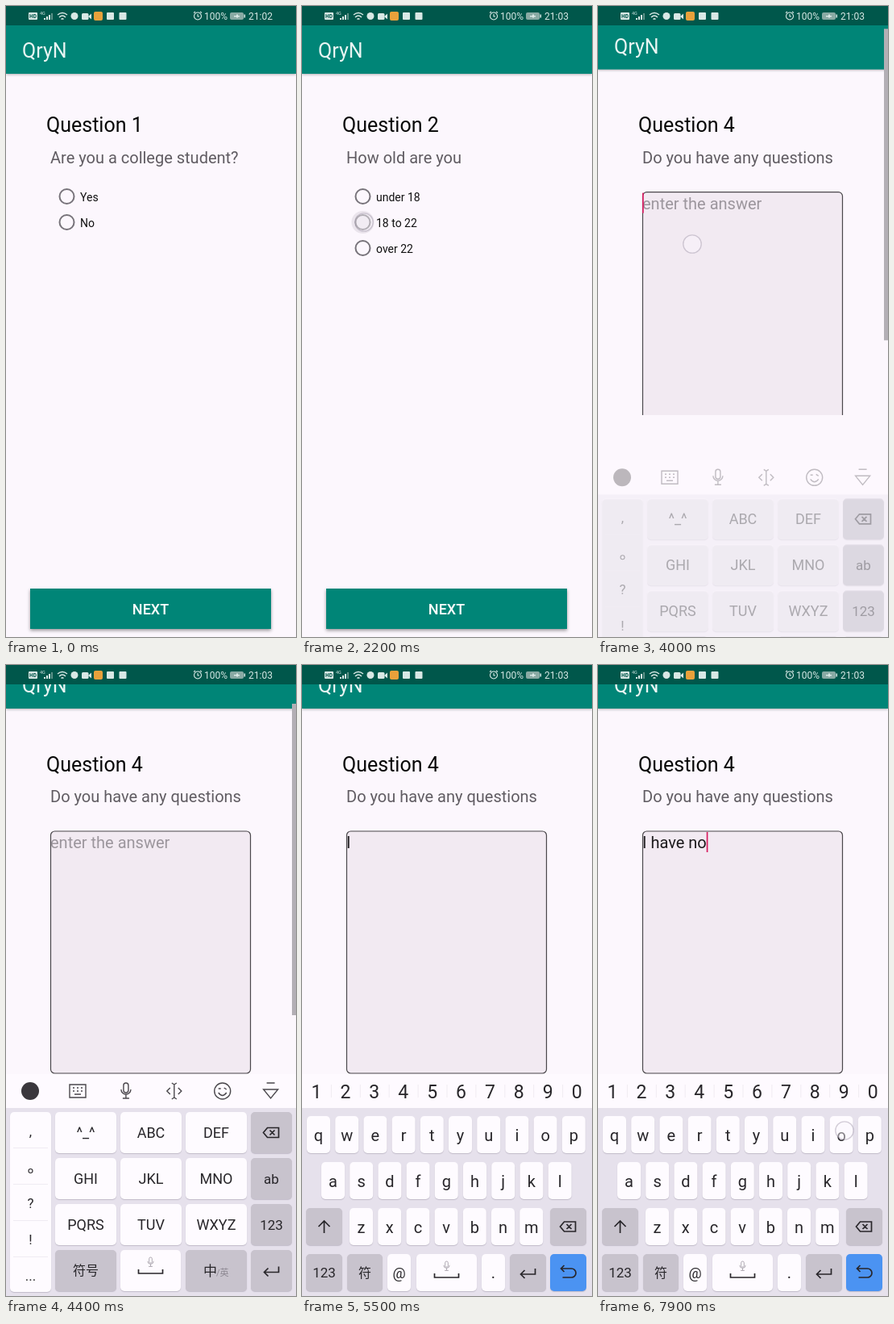
Write an HTML page with a canvas that moves like this. It is 360 px wide and 782 px high and loops after 8000 ms.

```html
<!DOCTYPE html>
<html lang="en">
<head>
<meta charset="utf-8">
<title>Survey app</title>
<style>
  html, body { margin: 0; width: 100%; height: 100%; overflow: hidden; background: #fcf7fd; }
  canvas { display: block; width: 100vw; height: 100vh; }
</style>
</head>
<body>
<canvas id="stage"></canvas>
<script>
const W = 360, H = 782, LOOP = 8000;
const canvas = document.getElementById('stage');
const c = canvas.getContext('2d');
const PAGE = '#fcf7fd', TEAL = '#008577', DARK_TEAL = '#00574b', ACCENT = '#b51f50';
const KEY = '#fefbff', GREY_KEY = '#c8c3cd', KEYS_BG = '#e6e1ec', INK = '#28262a';
const KEYBOARD_TOP = 507;

const questions = [
  { from: 0, tap: 1150, choice: 0, next: 1600, title: 'Question 1',
    text: 'Are you a college student?', options: ['Yes', 'No'] },
  { from: 1800, tap: 2100, choice: 1, next: 2400, title: 'Question 2',
    text: 'How old are you', options: ['under 18', '18 to 22', 'over 22'] },
  { from: 2600, tap: 2850, choice: 1, next: 3350, title: 'Question 3',
    text: 'Do you like college', options: ['a little', 'very', 'not at all'] },
];
const FORM_AT = 3600, FOCUS_AT = 3900, LATIN_AT = 4950, SHIFT_AT = 5200;
const typing = [[5400, 1], [5750, 2], [6150, 3], [6400, 4], [6600, 5], [6900, 6], [7200, 7], [7550, 8], [7850, 9]];
const ANSWER = 'I have no';

// start, duration, x, y
const touches = [
  ...questions.flatMap(q => [[q.tap, 150, 77, 236 + 32 * q.choice], [q.next, 130, 180, 748]]),
  [3900, 170, 117, 295], [4800, 130, 260, 752], [5080, 130, 27, 697], [5320, 130, 268, 583],
  [5700, 180, 179, 763], [6050, 150, 218, 641], [6320, 130, 38, 641], [6520, 130, 179, 702],
  [6800, 150, 91, 585], [7100, 150, 179, 760], [7480, 150, 249, 705], [7780, 220, 306, 577],
];

const icons = {
  backspace: 'M-10 0L-5-6H9V6H-5ZM-2-3L4 3M4-3L-2 3',
  enter: 'M9-5V2H-8M-4-3L-9 2L-4 7',
  shift: 'M0 8V-7M-7 0L0-7L7 0',
  undo: 'M-5-9L-9-5L-5-1M-9-5H4A5 5 0 0 1 4 6H-7',
  mic: 'M-3-7a3 3 0 0 1 6 0v6a3 3 0 0 1-6 0zM-6-2a6 6 0 0 0 12 0M0 4V9M-4 9H4',
  space: 'M-15-3V2H15V-3',
  keyboard: 'M-10-8H10V8H-10ZM-6-4h2M-1-4h2M4-4h2M-6 0h2M-1 0h2M4 0h2M-4 4H4',
  caret: 'M-5-4L-9 0L-5 4M5-4L9 0L5 4M0-8V8M-3-10L0-8L3-10M-3 10L0 8L3 10',
  smiley: 'M10 0A10 10 0 1 1-10 0A10 10 0 1 1 10 0M-5-3h3M2-4l3 2M-5 2Q0 9 5 2',
  collapse: 'M-5-10H5M-9-2H9L0 9Z',
  alarm: 'M4.5 0A4.5 4.5 0 1 1-4.5 0A4.5 4.5 0 1 1 4.5 0M0-2.5V.5H2M-5-4L-3-5.5M5-4L3-5.5',
  wifi: 'M-6-2Q0-7 6-2M-4 1Q0-3 4 1M-1.5 3.5Q0 2 1.5 3.5',
};

const clamp = v => Math.max(0, Math.min(1, v));
const smooth = v => (v = clamp(v), v * v * (3 - 2 * v));
const within = (t, start, length) => t >= start && t < start + length;

function text(s, x, y, size, color = INK, align = 'left', weight = 400) {
  c.font = `${weight} ${size}px Roboto, "Noto Sans CJK SC", "Noto Sans CJK", sans-serif`;
  c.textAlign = align;
  c.fillStyle = color;
  c.fillText(s, x, y);
}
function rect(x, y, w, h, color) {
  c.fillStyle = color;
  c.fillRect(x, y, w, h);
}
function box(x, y, w, h, r, fill, stroke) {
  c.beginPath();
  c.roundRect(x, y, w, h, r);
  if (fill) { c.fillStyle = fill; c.fill(); }
  if (stroke) { c.strokeStyle = stroke; c.lineWidth = 1.2; c.stroke(); }
}
function circle(x, y, r, fill, stroke, width = 1) {
  c.beginPath();
  c.arc(x, y, r, 0, 7);
  if (fill) { c.fillStyle = fill; c.fill(); }
  if (stroke) { c.strokeStyle = stroke; c.lineWidth = width; c.stroke(); }
}
function icon(name, x, y, color = INK, width = 1.4, scale = 1) {
  c.save();
  c.translate(x, y);
  c.scale(scale, scale);
  c.strokeStyle = color;
  c.lineWidth = width;
  c.stroke(new Path2D(icons[name]));
  c.restore();
}
function shadow(color, blur, dy) {
  c.shadowColor = color;
  c.shadowBlur = blur;
  c.shadowOffsetY = dy;
}

function statusBar(t) {
  const white = '#d9e8e5';
  rect(0, 0, W, 24, DARK_TEAL);
  box(28, 8, 11, 9, 1, white);
  text('HD', 33.5, 15, 6.5, DARK_TEAL, 'center', 700);
  text('4G', 42, 11, 5.5, white);
  for (let i = 0; i < 4; i++) rect(47 + i * 3, 15 - i * 2, 2, 2 + i * 2, i < 3 ? white : '#5f9289');
  icon('wifi', 70, 13, white, 1.4);
  circle(85, 12.5, 4.5, white);
  box(94, 9, 8.5, 8, 1.5, white);
  c.beginPath();
  c.moveTo(102, 13); c.lineTo(106, 9.5); c.lineTo(106, 16.5);
  c.fill();
  box(109, 7, 11, 11, 2, '#e9a13b');
  box(125, 8, 9, 9, 1, white);
  box(140.5, 8, 9, 9, 1, white);
  icon('alarm', 238, 12.5, white, 1.1);
  text('100%', 246, 17, 12, white);
  box(278, 8, 17, 9, 2, '#89aaa4');
  rect(295.5, 10.5, 1.5, 4, white);
  rect(283, 12, 7, 1.5, white);
  rect(286, 10.5, 2, 4, white);
  text(t < 2100 ? '21:02' : '21:03', 301, 17, 12, white);
}

function header() {
  shadow('rgba(0,0,0,.3)', 3, 1);
  rect(0, 0, W, 84, TEAL);
  shadow('transparent', 0, 0);
  text('QryN', 20, 64, 25, '#e9f5f3');
}

function nextButton(pressedFor) {
  shadow('rgba(0,0,0,.4)', 4, 2);
  rect(30, 722, 299, 50, TEAL);
  shadow('transparent', 0, 0);
  if (pressedFor >= 0) {
    c.save();
    c.beginPath();
    c.rect(30, 722, 299, 50);
    c.clip();
    circle(180, 748, 40 + pressedFor * .8, 'rgba(255,255,255,.2)');
    c.restore();
  }
  text('NEXT', 179.5, 754, 18, '#fff', 'center', 500);
}

function radio(y, label, sinceTap) {
  const x = 75.5, age = sinceTap - 150;
  if (sinceTap > 0) {
    const fade = 1 - clamp((age - 200) / 150);
    circle(x, y, 8 + 12 * smooth(sinceTap / 200), `rgba(60,40,70,${.09 * fade})`);
  }
  if (age > 0) {
    circle(x, y, 9, null, ACCENT, 2);
    circle(x, y, age < 120 ? 9 * smooth(age / 80) : 9 - 4 * smooth((age - 120) / 100), ACCENT);
  } else {
    circle(x, y, 9, null, '#77737a', 2);
  }
  text(label, 92, y + 5.5, 14, '#111');
}

function choicePage(t, q) {
  header();
  text(q.title, 50, 156, 25, '#080808');
  text(q.text, 55, 195, 20, '#605c62');
  q.options.forEach((label, i) => radio(236 + 32 * i, label, i === q.choice ? t - q.tap : -1));
  nextButton(t - q.next);
}

function formPage(t) {
  const pan = 30 * smooth((t - FOCUS_AT - 20) / 300);
  const length = typing.filter(([at]) => t >= at).length;
  const typed = ANSWER.slice(0, length);
  c.save();
  c.beginPath();
  c.rect(0, 0, W, t < FOCUS_AT ? H : KEYBOARD_TOP);
  c.clip();
  c.translate(0, -pan);
  header();
  text('Question 4', 50, 161.5, 25, '#080808');
  text('Do you have any questions', 55, 200, 20, '#605c62');
  box(55.5, 236, 248, 300, 5, '#f2eaf2', '#4a474b');
  if (length) text(typed, 55, 257, 20, '#1c1a1d');
  else text('enter the answer', 55, 257, 20, '#9c969d');
  if (t >= FOCUS_AT && (t - FOCUS_AT) % 1000 < 500) {
    c.font = '20px Roboto, sans-serif';
    rect(55 + c.measureText(typed).width, 237, 1.7, 25, '#d81b60');
  }
  if (t < FOCUS_AT) nextButton(-1);
  c.restore();

  c.globalAlpha = clamp((t - FOCUS_AT) / 60) * clamp((4700 - t) / 250);
  rect(355, 24 + pan * .8, 5, 386, '#b3afb5');
  c.globalAlpha = 1;
}

function key(x, y, w, h, label, size = 20, fill = KEY) {
  shadow('rgba(70,60,80,.22)', 1, 1);
  box(x, y, w, h, 5, fill);
  shadow('transparent', 0, 0);
  if (icons[label]) icon(label, x + w / 2, y + h / 2, INK, 1.7);
  else text(label, x + w / 2, y + h / 2 + size * .37, size, INK, 'center');
}

function spaceKey(y, h) {
  key(142, y, 75, h, '');
  icon('mic', 179.5, y + 15, '#a6a1aa', 1.5, .6);
  icon('space', 179.5, y + 27, INK, 1.7);
}

function phonePad() {
  circle(30, 528, 11, '#3a373c');
  ['keyboard', 'mic', 'caret', 'smiley', 'collapse']
    .forEach((name, i) => icon(name, 89 + i * 59.9, 528, '#4a474c'));
  key(5, 554, 51, 223, '');
  for (const y of [598, 643, 688, 733]) rect(9, y, 43, 1, '#efebf2');
  [[',', 584], ['?', 673], ['!', 718], ['...', 763]].forEach(([s, y]) => text(s, 30.5, y, 17, INK, 'center'));
  circle(30.5, 627, 2.5, null, INK, 1.1);
  const columns = [61, 142, 223];
  ['^_^ ABC DEF', 'GHI JKL MNO', 'PQRS TUV WXYZ'].forEach((row, r) =>
    row.split(' ').forEach((label, i) => key(columns[i], 554 + r * 57, 76, 51, label, 18)));
  ['backspace', 'ab', '123', 'enter'].forEach((label, r) =>
    key(304, 554 + r * 57, 51, 51, label, 17, GREY_KEY));
  key(61, 725, 76, 51, '符号', 16, GREY_KEY);
  spaceKey(725, 51);
  key(223, 725, 76, 51, '', 16, GREY_KEY);
  text('中', 245, 757, 17);
  text('/英', 261, 757, 11, '#8c8791');
}

function latinPad(upper) {
  const step = 35.2;
  [...'1234567890'].forEach((digit, i) => {
    text(digit, 18 + i * 35.9, 537, 23, INK, 'center');
    if (i) rect(i * 35.9, 520, 1, 16, '#f0ecf2');
  });
  [['qwertyuiop', 6], ['asdfghjkl', 24], ['zxcvbnm', 59]].forEach(([letters, x], r) =>
    [...letters].forEach((letter, i) => {
      const y = 559 + r * 57;
      key(x + i * step, y, 29, 46, '');
      text(upper ? letter.toUpperCase() : letter, x + 14.5 + i * step, y + 31, 20, INK, 'center');
    }));
  key(5, 673, 45, 46, 'shift', 20, GREY_KEY);
  key(308, 673, 45, 46, 'backspace', 20, GREY_KEY);
  key(5, 730, 45, 46, '123', 17, GREY_KEY);
  key(56, 730, 44, 46, '符', 16, GREY_KEY);
  key(106, 730, 29, 46, '@', 18);
  spaceKey(730, 46);
  key(223, 730, 29, 46, '.', 20);
  key(258, 730, 45, 46, 'enter', 20, GREY_KEY);
  key(308, 730, 45, 46, 'undo', 20, '#4b93f2');
}

function keyboard(t) {
  const p = clamp((t - FOCUS_AT) / 300);
  c.save();
  c.beginPath();
  c.rect(0, KEYBOARD_TOP, W, H);
  c.clip();
  c.globalAlpha = p;
  c.translate(0, 128 * (1 - p) ** 2);
  rect(0, KEYBOARD_TOP, W, 42, '#fefaff');
  rect(0, 549, W, 233, KEYS_BG);
  if (t < LATIN_AT) phonePad();
  else latinPad(t >= SHIFT_AT && t < typing[0][0]);
  c.restore();
}

function draw(t) {
  rect(0, 0, W, H, PAGE);
  if (t < FORM_AT) choicePage(t, questions.findLast(q => t >= q.from));
  else formPage(t);
  if (t >= FOCUS_AT) keyboard(t);
  statusBar(t);
  for (const [start, length, x, y] of touches)
    if (within(t, start, length)) circle(x, y, 11.2, 'rgba(250,246,252,.45)', 'rgba(150,140,160,.42)', 1.3);
}

function frame(now) {
  const ratio = window.devicePixelRatio || 1;
  const w = Math.round(innerWidth * ratio), h = Math.round(innerHeight * ratio);
  if (canvas.width !== w || canvas.height !== h) {
    canvas.width = w;
    canvas.height = h;
  }
  c.setTransform(w / W, 0, 0, h / H, 0, 0);
  draw(now % LOOP);
  requestAnimationFrame(frame);
}
requestAnimationFrame(frame);
</script>
</body>
</html>
```
